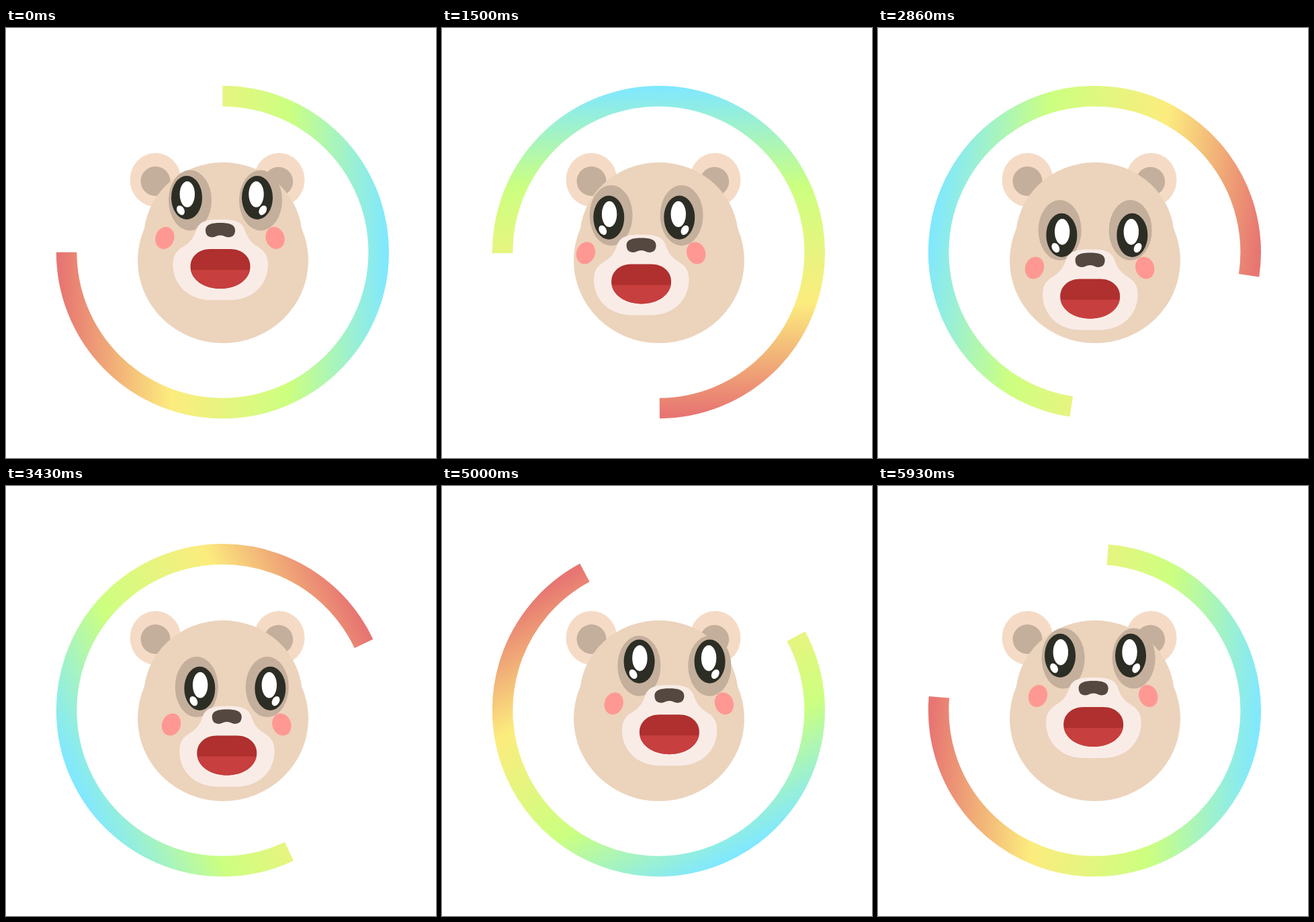
Recreate the animation shown at these times as an HTML page. Size 640 px wide and 640 px high, loop 6 s.

```html
<!DOCTYPE html>
<html lang="en">
<head>
<meta charset="utf-8">
<title>Bear loader</title>
<style>
  html, body { margin: 0; width: 100%; height: 100%; overflow: hidden; background: #fff; }
  svg { display: block; width: 100vw; height: 100vh; }
</style>
</head>
<body>
<svg viewBox="0 0 640 640">
  <defs>
    <linearGradient id="rainbow" gradientUnits="userSpaceOnUse" x1="-240" y1="0" x2="245" y2="0">
      <stop offset="0" stop-color="#e77672"/>
      <stop offset=".336" stop-color="#fcec7e"/>
      <stop offset=".697" stop-color="#ccff80"/>
      <stop offset="1" stop-color="#80e8ff"/>
    </linearGradient>
    <clipPath id="tongue"><rect x="270" y="360" width="100" height="30"/></clipPath>
    <path id="mouth" d="M274.5 355C274.5 340 287 329 304 329H334C351 329 363.5 340 363.5 355C363.5 374 344 388 319 388S274.5 374 274.5 355Z"/>
  </defs>

  <path id="ring" d="M0-232.3A232.3 232.3 0 1 1-232.3 0" fill="none" stroke="url(#rainbow)" stroke-width="30.6"/>

  <g fill="#f5dbc6">
    <ellipse cx="222.5" cy="226" rx="38" ry="40"/>
    <ellipse cx="406.5" cy="226" rx="38" ry="40"/>
  </g>
  <g fill="#c4af9c">
    <circle cx="222.5" cy="228" r="22"/>
    <circle cx="405.5" cy="228.5" r="21.7"/>
  </g>
  <g fill="#ecd3bc">
    <ellipse cx="323" cy="312" rx="118" ry="112"/>
    <ellipse cx="323" cy="346" rx="127" ry="123"/>
  </g>

  <g id="face">
    <g fill="#c4af9c">
      <ellipse cx="274" cy="256.5" rx="32" ry="45"/>
      <ellipse cx="379" cy="256.5" rx="32" ry="45"/>
    </g>
    <path fill="#f9ece7" d="M319.2 285C300 285 290 287 284 298C280 311 275 318 266 324C254 331 248.5 338 248.5 352C248.5 382 271 405 306 405H332.4C367.4 405 389.9 382 389.9 352C389.9 338 384.4 331 372.4 324C363.4 318 358.4 311 354.4 298C348.4 287 338.4 285 319.2 285Z"/>
    <path fill="#554841" d="M297 301C297 292 307 290 319 290C331 290 341 292 341 301C341 308 337 311.5 331 311.5C326 311.5 325 308.5 319 308.5C313 308.5 312 311.5 307 311.5C301 311.5 297 308 297 301Z"/>
    <use href="#mouth" fill="#af302e"/>
    <use href="#mouth" fill="#c73f3e" clip-path="url(#tongue)"/>
    <g fill="#ff9892">
      <ellipse rx="13.8" ry="16.8" transform="translate(236.3 312.5) rotate(20)"/>
      <ellipse rx="13.8" ry="16.8" transform="translate(400.6 312.5) rotate(-20)"/>
    </g>
    <g id="eyes">
      <g fill="#2c2d24">
        <ellipse cx="269" cy="252.5" rx="23" ry="32.6"/>
        <ellipse cx="374" cy="252.5" rx="23" ry="32.6"/>
      </g>
      <g fill="#fff">
        <ellipse cx="269.8" cy="247.5" rx="11.2" ry="19.3"/>
        <ellipse cx="372.5" cy="247.5" rx="11.2" ry="19.3"/>
        <ellipse rx="5.3" ry="7.6" transform="translate(260 271.3) rotate(-30)"/>
        <ellipse rx="5.3" ry="7.6" transform="translate(382.2 271.3) rotate(30)"/>
      </g>
    </g>
  </g>
</svg>
<script>
const LOOP = 6000, STEPS = 84;
const [ring, face, eyes] = ['ring', 'face', 'eyes'].map(id => document.getElementById(id));

// keys: [step, value, ...], interpolated linearly
const gazeKeys = [[0, 0, 0], [11, -2, 4.5], [30, 5, 9.5], [40, 7.7, 11.3], [57, 11.7, .5], [70, 5.2, -2.5], [84, 0, 0]];
const lagKeys = [[0, 0], [11, .55], [30, .2], [40, 0], [57, -1], [70, -1.75], [83, -.5], [84, 0]];

function at(keys, n) {
  const i = keys.findIndex(k => k[0] > n);
  const a = keys[i - 1], b = keys[i];
  const u = (n - a[0]) / (b[0] - a[0]);
  return a.slice(1).map((v, j) => v + (b[j + 1] - v) * u);
}

const move = (el, x, y, extra = '') => el.setAttribute('transform', `translate(${x} ${y})${extra}`);

function draw(now) {
  // the motion advances in 84 even steps per loop
  const n = Math.floor((now % LOOP + 4) / LOOP * STEPS) % STEPS;
  const turn = n / STEPS * 360, rad = turn * Math.PI / 180;
  const [lag] = at(lagKeys, n);
  move(ring, 322.4, 333.7, ` rotate(${-turn - lag})`);
  move(face, -22.4 * Math.sin(rad), 22.4 * (1 - Math.cos(rad)));
  move(eyes, ...at(gazeKeys, n));
}

const start = performance.now();
function tick() {
  draw(performance.now() - start);
  requestAnimationFrame(tick);
}
tick();
</script>
</body>
</html>
```
